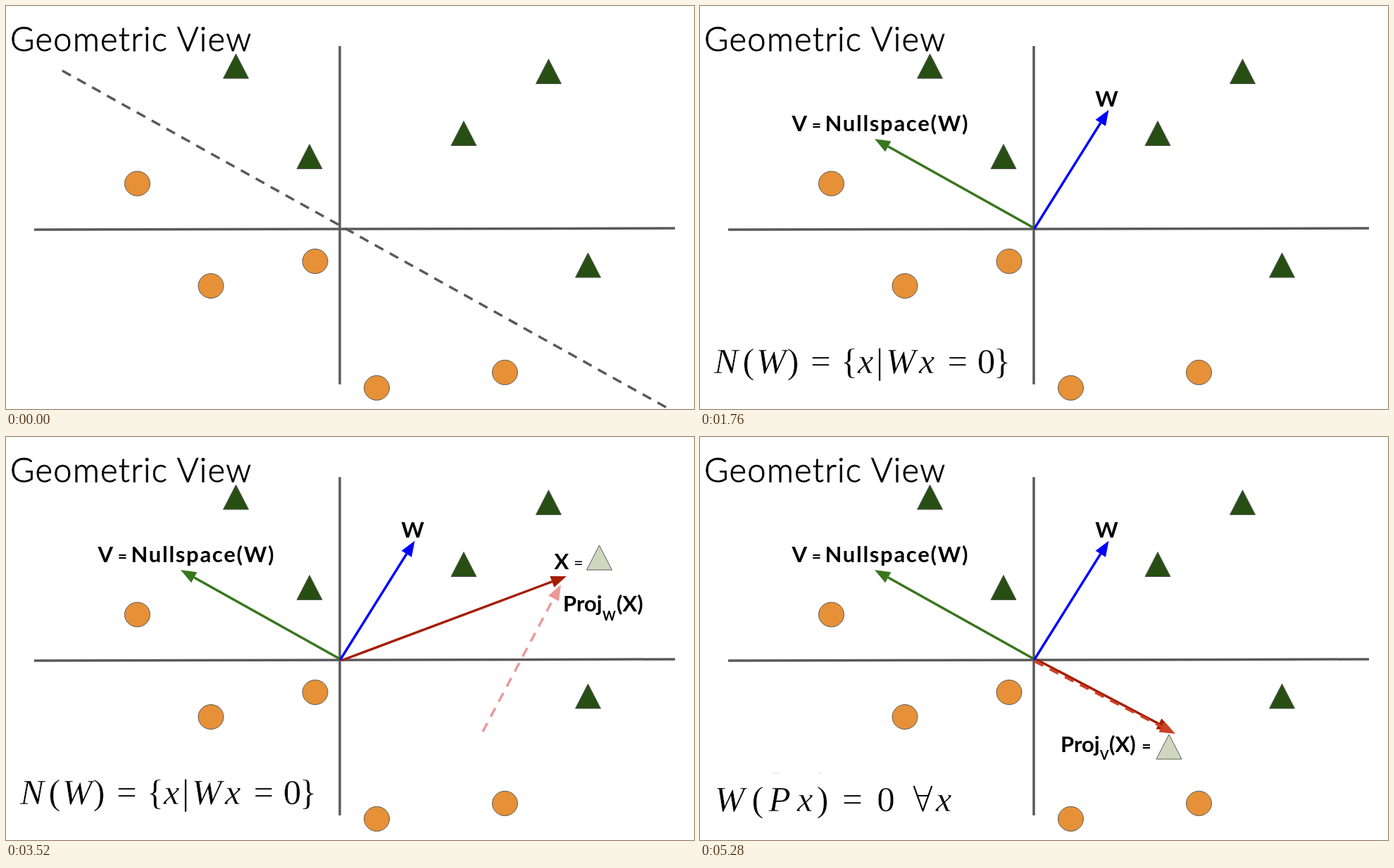
Animation, 977 px wide and 573 px high, one loop 6160 ms. Source, as an HTML page:

```html
<!DOCTYPE html>
<html lang="en">
<head>
<meta charset="utf-8">
<title>Geometric View</title>
<style>
  html, body { margin: 0; width: 100%; height: 100%; overflow: hidden; background: #fff; }
  svg { display: block; }
  .title { font: 300 47px Lato, sans-serif; letter-spacing: 1.3px; stroke: #000; stroke-width: .8px; }
  .label { font: 700 31px Lato, sans-serif; }
  .sub { font: 700 18px Lato, sans-serif; }
  .equals { font: 700 23px Lato, sans-serif; text-anchor: middle; }
  .thin { font-weight: 400; }
  .math { font: 51px "Liberation Serif", serif; text-anchor: middle; stroke: #fff; stroke-width: .5px; }
  .var { font-style: italic; }
</style>
</head>
<body>
<svg id="stage" width="977" height="573" viewBox="0 0 977 573"></svg>
<script>
const STEP = 880, COUNT = 7, WIDTH = 3.457;
const GREY = '#595959', RED = '#a61c00', PINK = '#ea9999';
const stage = document.getElementById('stage');
const layers = [];

function add(parent, tag, attrs, text) {
  const el = document.createElementNS('http://www.w3.org/2000/svg', tag);
  for (const key in attrs) el.setAttribute(key, attrs[key]);
  if (text) el.textContent = text;
  parent.appendChild(el);
  return el;
}

// A group that is visible from step `first` up to and including step `last`.
function layer(first, last = COUNT - 1) {
  const el = add(stage, 'g', {});
  layers.push({ el, first, last });
  return el;
}

const write = (g, cls, x, y, text) => add(g, 'text', { class: cls, x, y }, text);

function line(g, x1, y1, x2, y2, stroke, dashed) {
  add(g, 'line', { x1, y1, x2, y2, stroke, 'stroke-width': WIDTH,
    'stroke-dasharray': dashed ? `${4 * WIDTH} ${3 * WIDTH}` : 'none' });
}

function arrow(g, x1, y1, x2, y2, color, dashed) {
  const len = Math.hypot(x2 - x1, y2 - y1);
  const ux = (x2 - x1) / len, uy = (y2 - y1) / len;
  const bx = x2 - 22 * ux, by = y2 - 22 * uy, half = 8.5;
  line(g, x1, y1, bx, by, color, dashed);
  add(g, 'polygon', { fill: color, points:
    [x2, y2, bx - half * uy, by + half * ux, bx + half * uy, by - half * ux].join(' ') });
}

function triangle(g, x, top, fill) {
  add(g, 'path', { d: `M${x} ${top}l18 35h-36z`, fill, stroke: GREY });
}

function proj(g, x, y, axis, subY, tailX) {
  write(g, 'label', x, y, 'Proj');
  write(g, 'sub', x + 56, subY, axis);
  write(g, 'label', tailX, y, '(X)');
}

// Glyphs set one by one around their centres; letters are italic.
function formula(g, y, glyphs) {
  for (const [ch, x] of glyphs)
    write(g, /[a-z]/i.test(ch) ? 'math var' : 'math', x, y, ch);
}

const base = layer(0);
line(base, 40, 318, 950, 316, GREY);
line(base, 474, 57, 474, 538, GREY);
write(base, 'title', 6, 64, 'Geometric View');
for (const [x, y] of [[326.5, 68], [431, 196.5], [650, 163.5], [770.5, 75.5], [826.5, 351]])
  triangle(base, x, y, '#274e13');
for (const [cx, cy] of [[186.5, 252.5], [291, 398], [439, 363], [526.5, 543], [708.5, 521]])
  add(base, 'ellipse', { cx, cy, rx: 18, ry: 17.5, fill: '#e69138', stroke: GREY });

line(layer(0, 0), 80, 92, 938, 571, GREY, true);

const nullspace = layer(2);
arrow(nullspace, 474, 315.5, 248, 189, '#38761d');
write(nullspace, 'label', 130.5, 178, 'V');
write(nullspace, 'equals', 165.5, 178, '=');
add(nullspace, 'text', { class: 'label', x: 177.5, y: 178, 'letter-spacing': 1.7 }, 'Nullspace(W)');

const weight = layer(1);
arrow(weight, 474.5, 317, 580.5, 147.5, '#0000ff');
add(weight, 'text', { class: 'label', x: 577.5, y: 143, 'text-anchor': 'middle' }, 'W');

formula(layer(2, 5), 522, [['N', 37], ['(', 69], ['W', 101], [')', 132], ['=', 171.5],
  ['{', 212], ['x', 235], ['|', 255], ['W', 285], ['x', 322], ['=', 366], ['0', 406.5], ['}', 429]]);

const point = layer(3, 5);
arrow(point, 477, 317.5, 796, 198, RED);
write(point, 'label', 778.5, 188, 'X');
write(point, 'equals thin', 813, 187, '=');
triangle(point, 842.5, 154, '#d0d7bf');

const projW = layer(4, 5);
arrow(projW, 677, 419, 788, 210, PINK, true);
proj(projW, 791, 248, 'W', 261, 867);

const projV = layer(5, 5);
arrow(projV, 476, 318.5, 676, 422, PINK, true);
proj(projV, 547, 440, 'V', 451, 616);

const result = layer(6);
arrow(result, 478, 316.5, 671, 418, RED);
arrow(result, 475, 319, 675, 422, '#cc4125', true);
proj(result, 512, 448, 'V', 459, 581);
write(result, 'equals', 634, 448, '=');
triangle(result, 666, 423, '#d0d7bf');
add(result, 'path', { d: 'M102 478h12M168 478h5', stroke: '#ddd' });
formula(result, 532, [['W', 42], ['(', 82], ['P', 113], ['x', 149], [')', 174],
  ['=', 216.5], ['0', 264], ['x', 346]]);
add(result, 'path', { d: 'M304 497L316.5 531.5L329 497M309 510H324', fill: 'none',
  stroke: '#000', 'stroke-width': 2.2, 'stroke-linejoin': 'round', 'stroke-linecap': 'round' });

function draw() {
  const step = Math.floor(performance.now() / STEP) % COUNT;
  for (const { el, first, last } of layers)
    el.style.display = step >= first && step <= last ? '' : 'none';
  requestAnimationFrame(draw);
}
draw();
</script>
</body>
</html>
```
